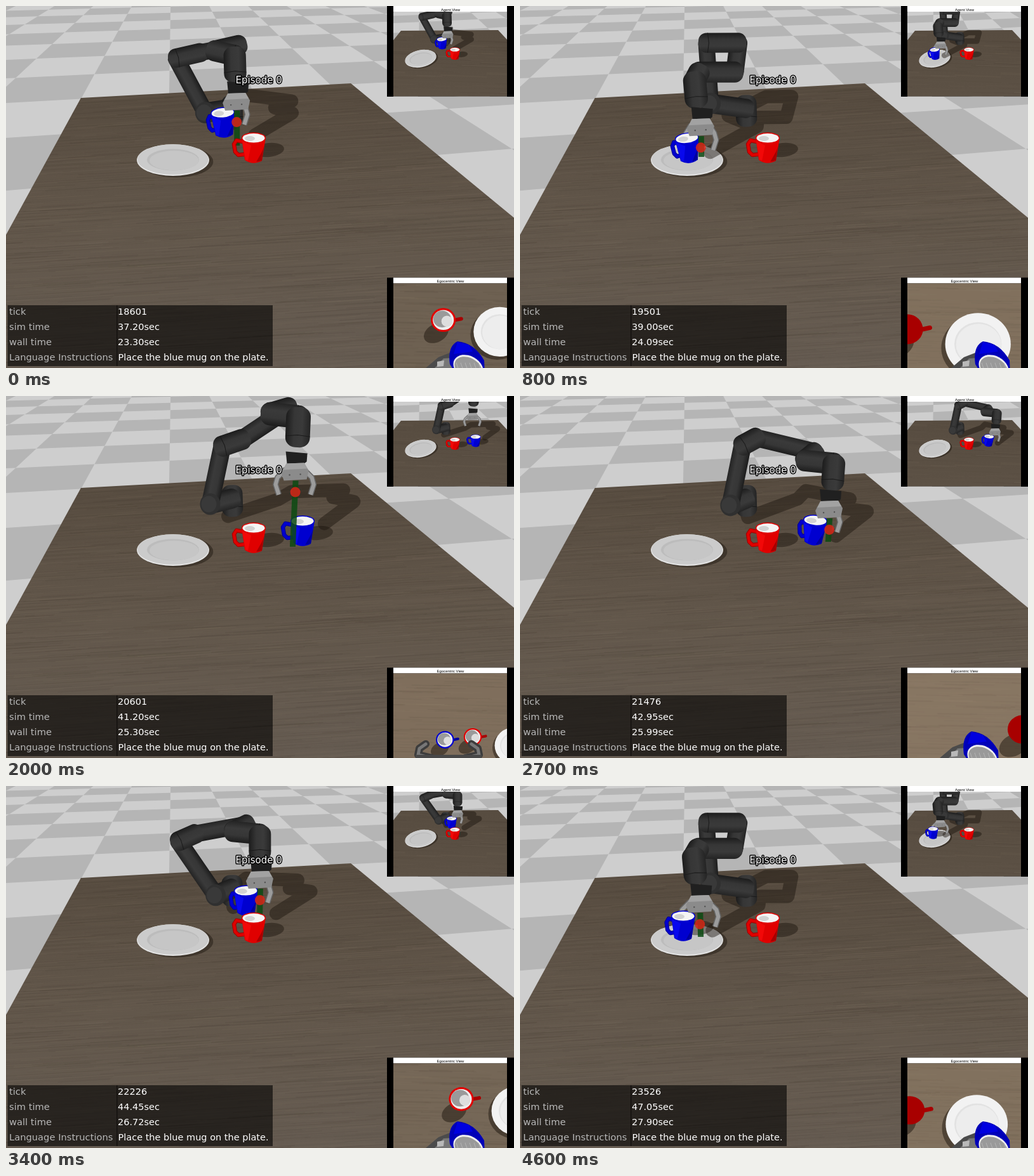
Recreate the animation shown at these times as an HTML page with a canvas. Size 800 by 571 pixels, loop 4.7 s.

```html
<!DOCTYPE html>
<html lang="en">
<head>
<meta charset="utf-8">
<title>Mug placing</title>
<style>
html, body { margin: 0; height: 100%; overflow: hidden; background: #000; }
canvas { display: block; width: 800px; height: 571px; }
</style>
</head>
<body>
<canvas id="stage" width="800" height="571"></canvas>
<script>
const ctx = document.getElementById('stage').getContext('2d');
const LOOP = 4700, STEP = 100;
const RESET = 1100, LEAD = 3600;
const SANS = '"DejaVu Sans", sans-serif';
const SHADOW = 'rgba(25,18,12,.45)';

// Metres from the robot base: u to the right, v away from the viewer, w up
const RED_AT = [.035, -.5], BLUE_AT = [.291, -.474], PLATE_AT = [-.342, -.421];

// Gripper tip: episode time, u, v, w
const tipPath = [
  [1100, 0, -.36, .28], [2000, .24, -.487, .28], [2250, .36, -.46, .16], [2450, .36, -.45, .055],
  [2700, .36, -.45, .066], [3400, .107, -.304, .13], [3600, -.013, -.31, .13],
  [3900, -.14, -.409, .126], [4400, -.27, -.398, .05], [4600, -.273, -.398, .068]];

// time, tick, wall time
const counters = [[0, 18601, 23.3], [800, 19501, 24.09], [2000, 20601, 25.3], [2700, 21476, 25.99],
  [3400, 22226, 26.72], [3900, 22826, 27.2], [4600, 23526, 27.9]];

function sample(track, t) {
  let i = 0;
  while (i < track.length - 2 && t >= track[i + 1][0]) i++;
  const a = track[i], b = track[i + 1];
  const k = Math.min(1, (t - a[0]) / (b[0] - a[0]));
  return a.slice(1).map((v, n) => v + (b[n + 1] - v) * k);
}

const ramp = (t, from, to) => Math.max(0, Math.min(1, (t - from) / (to - from)));
const along = (p, d, k) => p.map((v, i) => v + d[i] * k);

// Pinhole camera pitched 30 degrees down; returns screen x, y and pixels per metre
function project([u, v, w]) {
  const x = -.158 + .985 * u - .172 * v;
  const y = -.369 - .0866 * u - .495 * v - .8645 * w;
  const scale = 689 / (2.53 + .149 * u + .852 * v - .5026 * w);
  return [400 + x * scale, 285.5 + y * scale, scale];
}

let seed = 7;
const rand = () => (seed = seed * 16807 % 2147483647) / 2147483647;

function path(g, points) {
  g.beginPath();
  for (const [x, y] of points) g.lineTo(x, y);
}

function pairs(flat) {
  return flat.flatMap((v, i) => i % 2 ? [] : [[v, flat[i + 1]]]);
}

function poly(g, fill, ...flat) {
  path(g, pairs(flat));
  g.fillStyle = fill;
  g.fill();
}

function line(g, color, width, ...flat) {
  path(g, pairs(flat));
  g.strokeStyle = color;
  g.lineWidth = width;
  g.stroke();
}

function oval(g, fill, x, y, rx, ry = rx, a = 0) {
  g.beginPath();
  g.ellipse(x, y, rx, ry, a, 0, 7);
  g.fillStyle = fill;
  g.fill();
}

function box(g, fill, x, y, w, h) {
  g.fillStyle = fill;
  g.fillRect(x, y, w, h);
}

function text(g, s, x, y, size, fill, family = SANS) {
  g.font = size + 'px ' + family;
  g.fillStyle = fill;
  g.fillText(s, x, y);
}

function clipped(g, x, y, w, h, draw) {
  g.save();
  g.beginPath();
  g.rect(x, y, w, h);
  g.clip();
  draw();
  g.restore();
}

function layer(w, h, draw) {
  const c = document.createElement('canvas');
  c.width = w;
  c.height = h;
  draw(c.getContext('2d'));
  return c;
}

function grain(g, w, h, count, length, slope) {
  for (let i = 0; i < count; i++) {
    const x = rand() * (w + length) - length, y = rand() * (h + 40);
    const len = length * (.3 + rand());
    const tone = rand() < .5 ? '40,32,25' : '150,135,118';
    line(g, `rgba(${tone},${.03 + rand() * .06})`, .6 + rand(), x, y, x + len, y + len * slope);
  }
}

// Corner of the checkered floor in column i, row j
function floorPoint(i, j) {
  const c = .53 * i - .546, depth = 1 / (.00327 + .00067 * j + c / 4639);
  return [261 + depth * c, depth - 115];
}

function floor(g) {
  box(g, '#cecece', 0, 0, 800, 571);
  for (let i = -8; i < 12; i++) for (let j = -3; j < 14; j++)
    if (!((i + j) & 1))
      poly(g, '#b5b5b5', ...floorPoint(i, j), ...floorPoint(i + 1, j), ...floorPoint(i + 1, j + 1), ...floorPoint(i, j + 1));
}

function table(g, count, length, slope, ...outline) {
  const shade = g.createLinearGradient(0, outline[1], 0, outline[1] + 430);
  ['#574c40', '#62574b', '#665c52'].forEach((c, i) => shade.addColorStop(i / 2, c));
  g.save();
  poly(g, shade, ...outline);
  g.clip();
  grain(g, 800, 571, count, length, slope);
  g.restore();
}

function plate(g, x, y, rx, ry, a) {
  oval(g, SHADOW, x + rx * .09, y + ry * .1, rx * 1.02, ry, a);
  oval(g, '#e2e2e2', x, y, rx, ry, a);
  oval(g, '#cbcbcb', x, y - ry * .04, rx * .98, ry * .95, a);
  oval(g, '#bcbcbc', x, y - ry * .02, rx * .72, ry * .68, a);
  oval(g, '#c6c6c6', x + rx * .03, y + ry * .03, rx * .68, ry * .62, a);
}

function frame(g, y, title) {
  box(g, '#000', 600, y, 200, 143);
  box(g, '#fff', 610, y, 179, 9);
  g.textAlign = 'center';
  text(g, title, 700, y + 7.5, 6, '#000', '"Liberation Sans", sans-serif');
  g.textAlign = 'left';
}

const toAgent = g => g.transform(.424, 0, 0, .41, 541.5, -16.6);

const backdrop = layer(800, 571, g => {
  floor(g);
  table(g, 3000, 150, -.06, 118, 145, 543, 122, 800, 334, 800, 571, 0, 571, 0, 361);
  plate(g, 263, 243, 57, 25, 0);
  box(g, 'rgba(0,0,0,.6)', 2.5, 472, 417.5, 96);
  box(g, '#14110f', 174, 472, 1.5, 96);
  ['tick', 'sim time', 'wall time', 'Language Instructions'].forEach((s, i) => text(g, s, 5, 487 + 24 * i, 14.7, '#b8b8b8'));
  text(g, 'Place the blue mug on the plate.', 176.5, 559, 14.5, '#fff');
  frame(g, 0, 'Agent View');
  frame(g, 428.5, 'Egocentric View');
  clipped(g, 610, 9, 179, 133.5, () => {
    g.save();
    toAgent(g);
    floor(g);
    g.restore();
    table(g, 1800, 60, .04, 622, 39, 775, 38, 789, 53, 789, 143, 610, 143, 610, 54);
    plate(g, 653, 83, 25, 13.5, -.2);
  });
});

const desk = layer(520, 260, g => {
  box(g, '#6d6051', 0, 0, 520, 260);
  grain(g, 520, 260, 1200, 90, .02);
});

function tube(g, [x1, y1, s1], [x2, y2, s2], diameter) {
  const w = diameter * (s1 + s2) / 2, ext = w * .4, len = Math.hypot(x2 - x1, y2 - y1);
  const shade = g.createLinearGradient(0, -w / 2, 0, w / 2);
  ['#242424', '#3a3a3a', '#363636', '#1c1c1c'].forEach((c, i) => shade.addColorStop(i / 3, c));
  g.save();
  g.translate(x1, y1);
  g.rotate(Math.atan2(y2 - y1, x2 - x1));
  g.beginPath();
  g.roundRect(-ext, -w / 2, len + 2 * ext, w, w * .4);
  g.fillStyle = shade;
  g.fill();
  if (len > 20) line(g, '#1a1a1a', 1, len - 2, -w / 2, len - 4, 0, len - 2, w / 2);
  g.restore();
}

// Joints of a six-axis arm whose gripper hangs straight down to the tip
function solveArm(tip) {
  const side = .2, inner = .03, reach = .14, upper = .33, fore = .32, hip = .12;
  const radius = Math.hypot(tip[0], tip[1]);
  const yaw = Math.atan2(tip[1], tip[0]) + Math.asin(side / radius);
  const ahead = [Math.cos(yaw), Math.sin(yaw), 0], across = [ahead[1], -ahead[0], 0];
  const r = Math.sqrt(radius ** 2 - side ** 2) - reach, h = tip[2] + .33 - hip;
  const d = Math.min(Math.hypot(r, h), .645);
  const lift = Math.atan2(h, r) + Math.acos((upper ** 2 + d ** 2 - fore ** 2) / (2 * upper * d));
  const shoulder = along([0, 0, hip], across, side);
  const elbow = along(along(shoulder, ahead, upper * Math.cos(lift)), [0, 0, 1], upper * Math.sin(lift));
  const top = along(tip, [0, 0, 1], .33), wrist = along(top, ahead, -reach);
  return { shoulder, elbow, elbowIn: along(elbow, across, inner - side), wristIn: along(wrist, across, inner - side), wrist, top, tip };
}

function drawArm(g, arm) {
  const p = Object.fromEntries(Object.entries(arm).map(([k, v]) => [k, project(v)]));
  const [x, y] = p.shoulder;
  tube(g, project([0, 0, .12]), project([0, 0, .03]), .12);
  tube(g, project([0, 0, .09]), p.shoulder, .11);
  tube(g, p.elbowIn, p.wristIn, .09);
  tube(g, p.shoulder, p.elbow, .09);
  tube(g, p.elbowIn, p.elbow, .105);
  oval(g, '#303030', x, y, 16, 17);
  oval(g, '#393939', x - 2, y, 12, 13);
  tube(g, p.wristIn, p.wrist, .1);
  tube(g, p.wrist, p.top, .1);
  tube(g, p.top, project(along(arm.tip, [0, 0, 1], .245)), .105);
  const [gx, gy] = palmAt(p.tip);
  poly(g, '#202020', gx - 14, gy - 32, gx + 20, gy - 29, gx + 19, gy - 16, gx + 11, gy - 10, gx - 12, gy - 12);
}

const palmAt = ([x, y]) => [x - 1, y - 32];

function armShadow(g, { shoulder, elbow, elbowIn, wristIn, wrist, top, tip }) {
  const joints = [[0, 0, 0], shoulder, elbow, elbowIn, wristIn, wrist, top, tip];
  g.save();
  path(g, pairs([118, 145, 543, 122, 800, 334, 200, 334]));
  g.clip();
  g.lineJoin = g.lineCap = 'round';
  line(g, SHADOW, 21, ...joints.flatMap(([u, v, w]) => project([u + .85 * w, v + .9 * w, 0]).slice(0, 2)));
  g.restore();
}

const RED = ['#e00000', '#f20808', '#a80000'];
const BLUE = ['#0000d0', '#0808ee', '#00009c'];

function mug(g, x, y, tilt, handle, [main, light, dark]) {
  g.save();
  g.translate(x, y);
  g.rotate(tilt);
  g.lineJoin = 'round';
  for (const [c, w] of [[dark, 6.5], [main, 4]])
    line(g, c, w, -17, 6, -27 * handle, 4, -31 * handle, 10, -29 * handle, 22, -24 * handle, 27, -14, 26);
  g.beginPath();
  g.moveTo(-19, 0);
  g.lineTo(-14, 35);
  g.quadraticCurveTo(-1, 44, 13, 36);
  g.lineTo(19, 0);
  g.fillStyle = main;
  g.fill();
  poly(g, light, -18, 5, -4, 12, -9, 36, -13, 34);
  poly(g, dark, 4, 38, 13, 22, 16, 14, 13, 36);
  oval(g, main, 0, 0, 19, 8.5);
  oval(g, '#f4f4f4', 0, .3, 17.5, 7.3);
  oval(g, '#d2d2d2', -6, 1, 8, 4);
  g.restore();
}

function mugShadow(g, x, y) {
  oval(g, SHADOW, x + 24, y + 19, 24, 11, -.1);
}

function fingers(g, x, y, spread) {
  g.lineJoin = 'round';
  for (const s of [-1, 1]) {
    const p = [x + s * 14, y - 4, x + s * (spread - 3), y + 9, x + s * spread, y + 20, x + s * (spread - 5), y + 36];
    line(g, '#666', 9, ...p);
    line(g, '#9c9c9c', 6, ...p);
  }
}

function palm(g, x, y) {
  poly(g, '#8b8b8b', x - 13, y - 13, x + 15, y - 14, x + 22, y - 2, x + 19, y + 12, x - 17, y + 14, x - 21, y + 2);
  poly(g, '#a2a2a2', x - 13, y - 13, x + 15, y - 14, x + 20, y - 5, x - 18, y - 3);
  oval(g, '#555', x - 8, y + 5, 1.2);
  oval(g, '#555', x + 9, y + 4, 1.2);
}

function blueMug(s, [u, , w], [x, y]) {
  if (s < 2450) return [467, 197, 0, 1];
  if (s > 4500) return [257, 205, 0, .85];
  return [x - 22, y - 15, (u - .13) * .6 * Math.min(1, w / .1), .78];
}

function scene(g, s, tip, markers) {
  const arm = solveArm(tip), hand = project(tip), [gx, gy] = palmAt(hand);
  const [x, y, tilt, handle] = blueMug(s, tip, hand);
  armShadow(g, arm);
  if (!tilt) mugShadow(g, x, y);
  mugShadow(g, 390, 208);
  drawArm(g, arm);
  fingers(g, gx, gy, 18 + 12 * (1 - ramp(s, 2300, 2450) + ramp(s, 4250, 4500)));
  mug(g, x, y, tilt, handle, BLUE);
  if (markers) {
    const [fx, fy] = project([tip[0], tip[1], 0]);
    g.globalAlpha = .85;
    poly(g, '#0c4a12', hand[0] - 4, gy + 14, hand[0] + 5, gy + 14, fx + 4, fy, fx - 5, fy);
    oval(g, '#d82418', hand[0], hand[1], 8);
    g.globalAlpha = 1;
  }
  palm(g, gx, gy);
  mug(g, 390, 208, 0, 1, RED);
}

function topMug(g, x, y, r, [main, , dark]) {
  const seenInside = Math.abs(x - 700) < 75;
  oval(g, 'rgba(30,22,15,.5)', x - r * .6, y + r * 1.1, r * 1.1, r * .75, -.5);
  g.lineCap = 'round';
  line(g, dark, r * .3, x + r, y, x + r * 1.5, y - r * .1);
  oval(g, seenInside ? main : dark, x, y, r * 1.04, r);
  if (!seenInside) return;
  oval(g, '#ededed', x, y, r * .88, r * .84);
  oval(g, '#9a9a9a', x - r * .1, y - r * .08, r * .74, r * .7);
  oval(g, '#dedede', x + r * .3, y + r * .1, r * .46);
}

function heldMug(g, x, y) {
  poly(g, '#4b4b4b', x - 62, 571, x - 42, y + 3, x - 24, y - 4, x + 8, 571);
  poly(g, '#777', x - 48, 571, x - 34, y + 5, x - 20, y + 4, x - 16, 571);
  poly(g, '#b9b9b9', x - 44, y + 10, x - 33, y + 8, x - 34, y + 17, x - 44, y + 18);
  g.beginPath();
  g.moveTo(x - 24, y + 14);
  g.quadraticCurveTo(x - 28, y - 14, x - 12, y - 22);
  g.quadraticCurveTo(x + 14, y - 20, x + 30, y + 8);
  g.lineTo(x + 31, y + 30);
  g.lineTo(x - 14, y + 30);
  g.fillStyle = '#0000b8';
  g.fill();
  poly(g, '#0000e0', x - 12, y - 21, x + 6, y - 16, x + 12, y - 6, x - 18, y - 2);
  oval(g, '#f0f0f0', x + 5, y + 19, 25, 18, .5);
  oval(g, '#999', x + 5, y + 20, 23, 16, .5);
  for (let i = -14; i < 24; i += 7) line(g, '#b4b4b4', 1, x + i, y + 12, x + i + 3, 571);
}

function openFingers(g) {
  for (const s of [-1, 1]) {
    const p = [697 + s * 26, 571, 697 + s * 48, 566, 697 + s * 46, 556, 697 + s * 36, 549];
    line(g, '#3c3c3c', 12, ...p);
    line(g, '#777', 5, ...p);
  }
  box(g, '#484848', 645, 566, 104, 5);
}

// Camera on the wrist, looking down with left and right swapped
function egoView(g, s, [u, v, w]) {
  const zoom = 93.5 / (.267 + w);
  const place = ([ou, ov]) => [700 - zoom * (ou - u), 540 + zoom * (ov - v)];
  clipped(g, 610, 437.5, 179, 133.5, () => {
    g.drawImage(desk, 440 + 187 * u, 377 - 150 * (v + .4));
    box(g, `rgba(255,215,175,${.5 * Math.abs(u)})`, 610, 437, 179, 134);
    const [px, py] = place(PLATE_AT), pr = zoom * .175;
    oval(g, 'rgba(30,22,15,.5)', px - pr * .1, py + pr * .12, pr * 1.02, pr * .95);
    oval(g, '#f2f2f2', px, py, pr, pr * .95);
    oval(g, '#e2e2e2', px, py, pr * .72, pr * .67);
    oval(g, '#ededed', px + 1, py + 1, pr * .69, pr * .64);
    topMug(g, ...place(RED_AT), zoom * .08, RED);
    if (s >= 2300) heldMug(g, 723 + 18 * ramp(s, 4100, 4400), 551);
    else {
      topMug(g, ...place(BLUE_AT), zoom * .08, BLUE);
      openFingers(g);
    }
  });
}

function draw(t) {
  const s = t < RESET ? t + LEAD : t, tip = sample(tipPath, s);
  ctx.drawImage(backdrop, 0, 0);
  scene(ctx, s, tip, true);
  ctx.lineJoin = 'round';
  ctx.font = '15px ' + SANS;
  ctx.strokeStyle = '#000';
  ctx.lineWidth = 3;
  ctx.strokeText('Episode 0', 361.5, 122);
  text(ctx, 'Episode 0', 361.5, 122, 15, '#fff');

  const [rawTick, wall] = sample(counters, t);
  const tick = 18601 + 25 * Math.round((rawTick - 18601) / 25);
  [tick, (tick * .002).toFixed(2) + 'sec', wall.toFixed(2) + 'sec'].forEach((v, i) => text(ctx, v, 176, 487 + 24 * i, 14.5, '#fff'));

  clipped(ctx, 610, 9, 179, 133.5, () => {
    toAgent(ctx);
    scene(ctx, s, tip, false);
  });
  egoView(ctx, s, tip);
}

const start = performance.now();
function loop() {
  const t = (performance.now() - start) % LOOP;
  draw(Math.floor(t / STEP) * STEP);
  requestAnimationFrame(loop);
}
loop();
</script>
</body>
</html>
```
